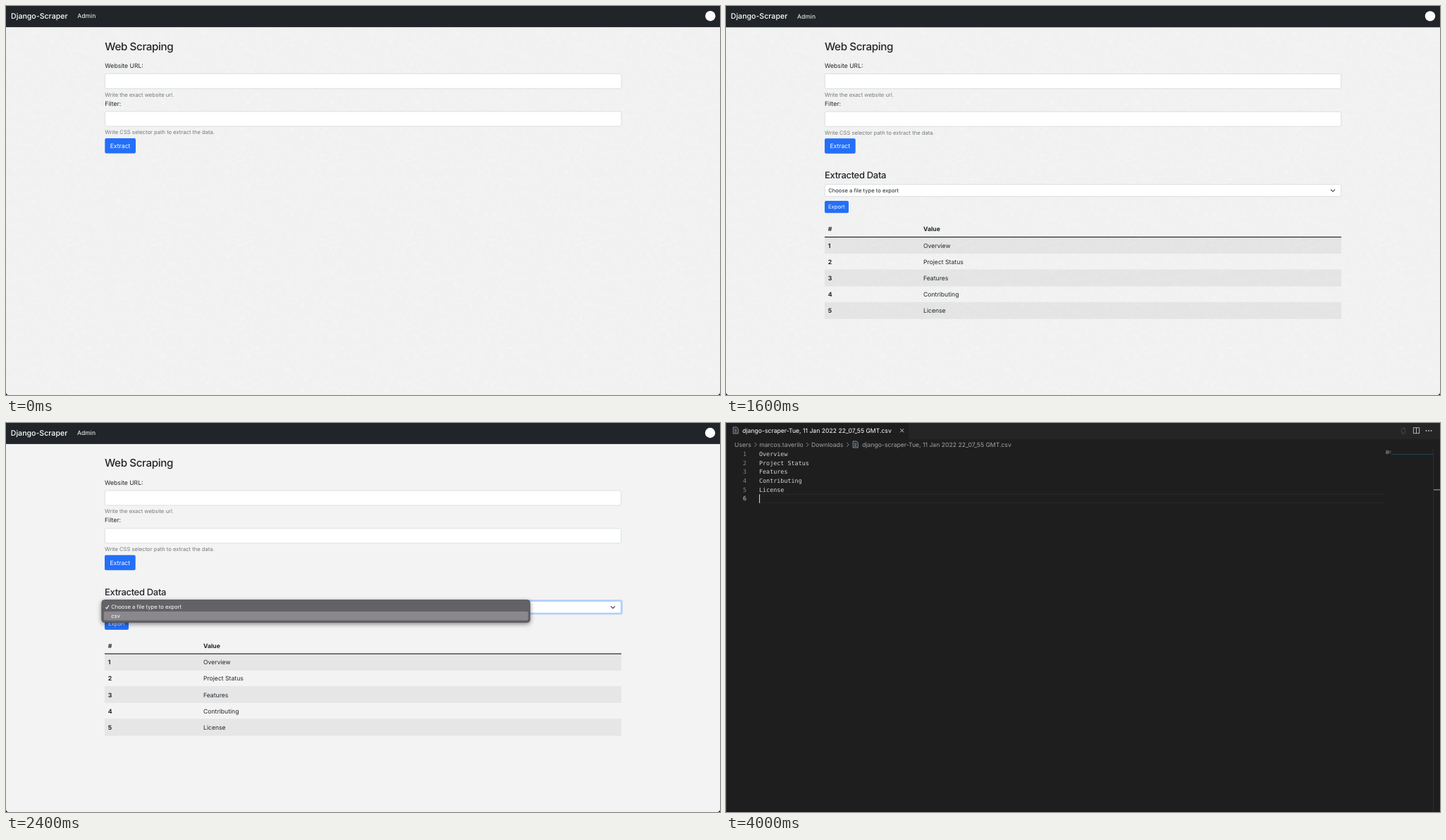
Write an HTML page that moves like this. It is 1013 px wide and 553 px high and loops after 4.8 s.

```html
<!DOCTYPE html>
<html lang="en">
<head>
<meta charset="utf-8">
<title>Django-Scraper</title>
<style>
  html, body { margin: 0; width: 100%; height: 100%; overflow: hidden; background: #f2f2f2; }
  svg { display: block; width: 100%; height: 100%; }
  text { font-family: Inter, Roboto, sans-serif; text-rendering: geometricPrecision; white-space: pre; }
  .mono { font-family: "DejaVu Sans Mono", monospace; }
</style>
</head>
<body>
<svg id="stage" viewBox="0 0 1013 553"></svg>
<script>
const STEP = 800;
const BASE = 8.65, SMALL = 7.63;
const INK = '#212529', MUTED = '#74797e', BLUE = '#246ffa';
const ROWS = ['Overview', 'Project Status', 'Features', 'Contributing', 'License'];
const FILE = 'django-scraper-Tue, 11 Jan 2022 22_07_55 GMT.csv';

const text = (x, y, s, fill = INK, size = BASE, extra = '') =>
  `<text x="${x}" y="${y}" fill="${fill}" font-size="${size}" ${extra}>${s.replace(/>/g, '&gt;')}</text>`;
const rect = (x, y, w, h, fill, extra = '') =>
  `<rect x="${x}" y="${y}" width="${w}" height="${h}" fill="${fill}" ${extra}/>`;
const line = (d, stroke, width = 1) =>
  `<path d="${d}" fill="none" stroke="${stroke}" stroke-width="${width}"/>`;
const weight = w => `font-weight="${w}"`;

// Pale scribbles of the page's paper texture
function paper() {
  let seed = 7, d = '';
  const rnd = n => (seed = seed * 16807 % 2147483647) / 2147483647 * n;
  for (let i = 0; i < 420; i++) {
    const bend = () => (rnd(10) - 5).toFixed(1);
    d += `M${rnd(120).toFixed(1)} ${rnd(120).toFixed(1)}q${bend()} ${bend()} ${bend()} ${bend()}`;
  }
  return `<defs><pattern id="paper" width="120" height="120" patternUnits="userSpaceOnUse">
    ${rect(0, 0, 120, 120, '#f0f1f0')}${line(d, '#f5f6f5', .7)}</pattern></defs>`;
}

function field(y, value) {
  return rect(140.3, y, 732.4, 21, value ? '#e7f0fd' : '#fff', 'rx="2" stroke="#ced4da" stroke-width=".7"') +
    text(147.5, y + 13.9, value, '#000');
}

function form(url, filter) {
  return text(140, 62.5, 'Web Scraping', INK, 15.2, weight(500) + ' letter-spacing="-.025em"') +
    text(140, 87.9, 'Website URL:') + field(96.2, url) +
    text(140, 128.7, 'Write the exact website url.', MUTED, SMALL) +
    text(140, 141.7, 'Filter:') + field(150, filter) +
    text(140, 182.4, 'Write CSS selector path to extract the data.', MUTED, SMALL) +
    rect(140, 188, 43.7, 21.5, BLUE, 'rx="2"') + text(147.4, 202, 'Extract', '#fff');
}

function results({ choice = 'Choose a file type to export', focus, pressed }) {
  const ring = (x, y, w, h) => rect(x, y, w, h, '#bcd4fa', 'rx="3.5"');
  let s = text(140, 245, 'Extracted Data', INK, 13, weight(500) + ' letter-spacing="-.025em"');
  if (focus) s += ring(138, 251.2, 737, 21.4);
  s += rect(140.3, 253.5, 732.4, 17, '#fff',
    `rx="2" stroke="${focus ? '#86b7fe' : '#ced4da'}" stroke-width=".7"`);
  s += text(145.2, 265, choice, INK, SMALL) + line('M858 260.6l3 3 3-3', '#343a40', 1.1);
  if (pressed) s += ring(137.8, 274.6, 38.4, 21.8);
  s += rect(140, 276.8, 34, 17.3, pressed ? '#2360cd' : BLUE, 'rx="2"') +
    text(145, 288.2, 'Export', '#fff', SMALL);
  s += text(144.7, 319.9, '#', INK, BASE, weight(700)) + text(280, 319.9, 'Value', INK, BASE, weight(700));
  ROWS.forEach((name, i) => {
    const y = 328.5 + i * 23.2;
    if (i % 2 == 0) s += rect(140, y, 733, 23.2, '#000', 'fill-opacity=".055"');
    s += rect(140, y + 22.7, 733, .5, '#dee2e6') +
      text(144.7, y + 15, String(i + 1), INK, BASE, weight(700)) + text(280, y + 15, name);
  });
  return s + rect(140, 327.7, 733, 1.2, INK);
}

function page({ dx = 0, dy = 0, bg = '#f3f3f3', url = '', filter = '', body = '', over = '' }) {
  return rect(0, 0, 1013, 553, bg) +
    `<g transform="translate(${dx} ${dy})">` +
    rect(-2, -5, 1017, 35.1, INK) +
    text(6.8, 18, 'Django-Scraper', '#fff', 10.6, weight(500)) +
    text(101, 17.4, 'Admin', '#fff') +
    '<circle cx="999" cy="14.2" r="7.2" fill="#fff"/>' +
    form(url, filter) + body + '</g>' + over +
    '<path d="M0 549v4h4q-4 0-4-4zM1013 549v4h-4q4 0 4-4z"/>';
}

function menu() {
  return `<g style="filter:drop-shadow(0 2px 3px #0007)">` +
    rect(135.8, 251.6, 607.6, 31.8, '#636266', 'rx="4" stroke="#4f4e52" stroke-width=".7"') + '</g>' +
    rect(138.8, 268, 602, 12.5, '#8b888d', 'rx="2"') +
    line('M141.4 262l1.6 1.9 3-4.6', '#fff', 1.1) +
    text(149.2, 264.3, 'Choose a file type to export', '#fff', SMALL) +
    text(149.2, 277, 'csv', '#fff', SMALL);
}

function downloads() {
  return rect(0, 520.6, 1013, 33, '#35363a') + rect(0, 520.6, 1013, .6, '#55565a') +
    '<path d="M12.6 532.6h4l2.6 2.6v5.8h-6.600z" fill="#e8eaed"/>' + line('M16.4 532.6v2.800h2.800', '#35363a', .6) +
    text(27.8, 539.8, 'django-scraper-....csv', '#e8eaed', 7.05, weight(500)) +
    line('M118 538.300l2.400-2.400 2.400 2.400', '#dadce0') +
    rect(133.2, 525, .7, 25, '#6a6b6f') +
    text(955, 539, 'Show All', '#8ab4f8', 7, weight(500)) +
    line('M1000.600 534.600l4.600 4.600m0-4.600l-4.600 4.600', '#e8eaed');
}

function editor() {
  const doc = (x, y) => line(`M${x} ${y}h5l2 2v7h-7zM${x + 1.6} ${y + 3}h3.6m-3.600 2h3.600m-3.600 2h3.600`, '#8fa3b5', .9);
  const next = x => line(`M${x - 1.6} 27.800l3 3-3 3`, '#a0a0a0', .8);
  const crumb = '#a4a4a4';
  let s = rect(0, 0, 1013, 553, '#1e1e1e') + rect(259, 0, 754, 23.2, '#252526') +
    rect(0, 0, 1, 553, '#343435') +
    doc(10.2, 6) + text(23.2, 14, FILE, '#fff') +
    line('M247.200 8.200l5 5m0-5l-5 5', '#e0e0e0', .9) +
    line('M958.500 7v6.500q0 1 1 1h2m-2-2l2 2-2 2M963.500 15v-6.500q0-1-1-1h-2m2-2l-2 2 2 2', '#494949', .9) +
    line('M975.300 6.700h8.400v8h-8.400zM979.500 6.700v8', '#c5c5c5', .9);
  for (const x of [993.5, 997, 1000.5]) s += `<circle cx="${x}" cy="11" r=".9" fill="#c5c5c5"/>`;

  s += text(12, 33.9, 'Users', crumb) + next(42) + text(47.2, 33.9, 'marcos.taverilo', crumb) + next(115.6) +
    text(121, 33.9, 'Downloads', crumb) + next(172.7) + doc(180.2, 26) + text(193.2, 33.9, FILE, crumb);

  s += rect(47, 101, 887, .7, '#2b2b2b') + rect(47, 113.2, 887, .7, '#2b2b2b');
  [...ROWS, ''].forEach((name, i) => {
    const y = 47 + i * 12.65;
    s += text(29, y, String(i + 1), name ? '#858585' : '#d0d0d0', 8.42, 'class="mono" text-anchor="end"') +
      text(47, y, name, '#d4d4d4', 8.42, 'class="mono"') +
      rect(936, 38.8 + i * 1.15, name.length * .57, .7, '#7d7d7d');
  });
  return s + rect(47, 101.4, 1.1, 12.4, '#d0d0d0') +
    rect(944, 44, 59, 1, '#214558') +
    rect(1003, 37, .8, 516, '#303030') + rect(1004, 94.3, 9, 1.3, '#8e8e8e');
}

const scenes = [
  page({ dx: .3, bg: 'url(#paper)' }),
  page({ dy: .3, url: 'https://github.com/pondmark/django-scraper',
    filter: '#readme > div.Box-body.px-5.pb-5 > article > h2' }),
  page({ dy: .2, bg: 'url(#paper)', body: results({}) }),
  page({ dy: -.2, body: results({ focus: true }), over: menu() }),
  page({ dy: -.9, bg: '#f2f2f2', body: results({ choice: 'csv', pressed: true }), over: downloads() }),
  editor()
];

const stage = document.getElementById('stage');
stage.innerHTML = paper() + scenes.map(s => `<g class="scene" display="none">${s}</g>`).join('');
const groups = [...stage.querySelectorAll('.scene')];

const start = performance.now();
function draw(now) {
  const current = Math.floor(Math.max(0, now - start) / STEP) % scenes.length;
  groups.forEach((g, i) => g.setAttribute('display', i == current ? 'inline' : 'none'));
  requestAnimationFrame(draw);
}
draw(start);
</script>
</body>
</html>
```
